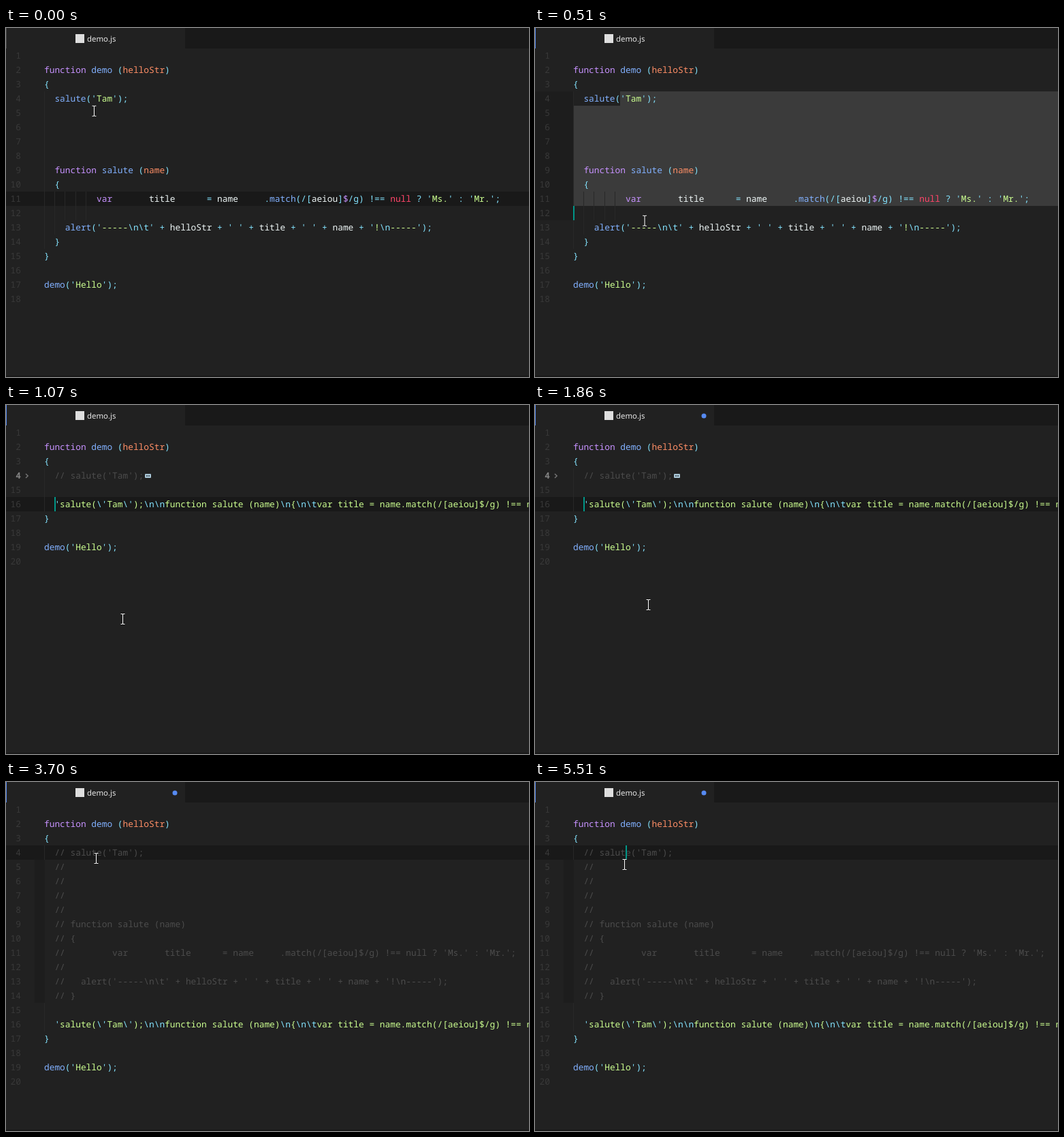
Recreate the animation shown at these times as an HTML page. Size 768x512 px, loop 5590 ms.

```html
<!DOCTYPE html>
<html lang="en">
<head>
<meta charset="utf-8">
<title>Editor demo</title>
<style>
  html, body { margin: 0; width: 100%; height: 100%; overflow: hidden; background: #212121; }
  svg { display: block; width: 768px; height: 512px; }
  text {
    font: 12.83px "Noto Sans Mono", monospace;
    white-space: pre;
    text-rendering: geometricPrecision;
  }
  text.tab { font: 11.4px "Noto Sans", sans-serif; }
</style>
</head>
<body>
<svg id="stage" viewBox="0 0 768 512"></svg>
<script>
const LOOP = 5590, COL = 7.7, ROW = 21, LEFT = 56, TOP = 30;
const FOCUS = 50, RUN = 1070, DIRTY = 1360, UNFOLD = 3100;
const C = {
  bg: '#212121', dark: '#191919', gutter: '#1d1d1d', select: '#3b3b3b', guide: '#282828',
  num: '#393939', comment: '#4c4c4c', caret: '#009688', accent: '#568af2',
  keyword: '#c792ff', call: '#82b1ff', punct: '#84e4ff', string: '#ccff90',
  param: '#ff8f66', nil: '#ff4569', plain: '#eef6f6'
};

const stage = document.getElementById('stage');
const colX = c => LEFT + c * COL;
const rowY = r => TOP + (r - 1) * ROW;

function el(parent, tag, attrs, content) {
  const n = document.createElementNS('http://www.w3.org/2000/svg', tag);
  set(n, attrs);
  if (content) n.textContent = content;
  return parent.appendChild(n);
}
function set(n, attrs) {
  for (const k in attrs) n.setAttribute(k, attrs[k]);
}
const rect = (p, x, y, width, height, fill) => el(p, 'rect', { x, y, width, height, fill });
const group = p => el(p, 'g', {});
const show = (n, on) => n.setAttribute('display', on ? 'inline' : 'none');

// Code
const body = String.raw`  salute('Tam');




  function salute (name)
  {
          var       title      = name     .match(/[aeiou]$/g) !== null ? 'Ms.' : 'Mr.';

    alert('-----\n\t' + helloStr + ' ' + title + ' ' + name + '!\n-----');
  }`.split('\n');
const head = ['', 'function demo (helloStr)', '{'];
const tail = ['}', '', "demo('Hello');", ''];
const packed = String.raw`  'salute(\'Tam\');\n\nfunction salute (name)\n{\n\tvar title = name.match(/[aeiou]$/g) !== null ? `;
const comments = body.map(s => '  // ' + s.slice(2));

const plainLines = [...head, ...body, ...tail];
const foldedLines = [...head, comments[0], '', packed, ...tail];
const openLines = [...head, ...comments, '', packed, ...tail];

// Highlighting
const TOKENS = /(\/\/.*)|('(?:\\.|[^'\\])*'?)|(\/\[\w+\]\$\/g)|(\b(?:function|var)\b)|(null)|(\w+(?= ?\())|(\((?:name|helloStr)\))|(\w+)|([^\s\w]+?)/g;
const KINDS = ['comment', 'string', 'regex', 'keyword', 'nil', 'call', 'param', 'plain', 'punct'];

function parts(kind, s) {
  if (kind === 'string') {
    return s.match(/\\.|^'|'$|[^\\']+/g).map(p => [p, /^['\\]/.test(p) ? C.punct : C.string]);
  }
  if (kind === 'regex') {
    return s.match(/\w{2,}|./g).map(p => [p, p === '$' ? C.keyword : p.length > 1 ? C.plain : C.punct]);
  }
  if (kind === 'param') {
    return [['(', C.punct], [s.slice(1, -1), C.param], [')', C.punct]];
  }
  return [[s, C[kind]]];
}

function drawWords(p, s, col, y, fill) {
  for (const m of s.matchAll(/\S+/g)) el(p, 'text', { x: colX(col + m.index), y, fill }, m[0]);
}

function drawCode(p, lines, number) {
  lines.forEach((line, i) => {
    const y = rowY(i + 1) + 15;
    const n = number(i + 1);
    el(p, 'text', { x: 22, y, fill: C.num, 'text-anchor': 'end' }, String(n));
    for (const m of line.matchAll(TOKENS)) {
      const kind = KINDS[m.slice(1).findIndex(Boolean)];
      let col = m.index;
      for (const [s, fill] of parts(kind, m[0])) {
        drawWords(p, s, col, y, fill);
        col += s.length;
      }
    }
  });
}

const guide = (p, col, from, to) =>
  rect(p, Math.floor(colX(col)), rowY(from), 1, (to - from + 1) * ROW, C.guide);

// Window
rect(stage, 0, 0, 768, 512, C.bg);
rect(stage, 263, 0, 505, 30, C.dark);
rect(stage, 0, 510, 768, 2, C.dark);
const edge = rect(stage, 0, 0, 1, 30, C.accent);
rect(stage, 102, 9, 13, 13, '#dedede');
el(stage, 'text', { class: 'tab', x: 119, y: 20, fill: '#e6e6e6' }, 'demo.js');
const dot = el(stage, 'circle', { cx: 248, cy: 16, r: 3.5, fill: C.accent });

// Before the command runs
const plain = group(stage);
const activeRow = rect(plain, 0, 0, 768, ROW, C.dark);
const shade = rect(plain, 0, rowY(4), 57, ROW, C.gutter);
const selFirst = rect(plain, 125, rowY(4), 0, ROW, C.select);
const selMid = rect(plain, 57, rowY(5), 711, 0, C.select);
const selLast = rect(plain, 57, 0, 0, ROW, C.select);
guide(plain, 0, 4, 14);
guide(plain, 2, 11, 13);
[4, 6, 8].forEach(c => guide(plain, c, 11, 12));
drawCode(plain, plainLines, n => n);

// Commented and folded
const folded = group(stage);
rect(folded, 0, rowY(6), 768, ROW, C.dark);
guide(folded, 0, 4, 6);
drawCode(folded, foldedLines, n => n < 5 ? n : n + 10);
rect(folded, 12, rowY(4), 11, ROW, C.bg);
el(folded, 'text', { x: 22, y: rowY(4) + 15, fill: '#858585', 'text-anchor': 'end', 'font-weight': 700, style: 'font-weight:700' }, '4');
el(folded, 'path', { d: 'M29 101l3.2 3-3.2 3', fill: 'none', stroke: '#777', 'stroke-width': 1.4 });
el(folded, 'rect', { x: 204, y: 101, width: 9, height: 6, rx: 1, fill: '#a9c6d6' });
[206, 208, 210].forEach(x => rect(folded, x, 103, 1, 2, '#29323a'));

// Commented and unfolded
const open = group(stage);
rect(open, 0, rowY(4), 768, ROW, C.dark);
rect(open, 42, rowY(5), 15, 10 * ROW, C.gutter);
guide(open, 0, 4, 4);
guide(open, 0, 15, 16);
drawCode(open, openLines, n => n);

const caret = rect(stage, 0, 0, 2, ROW, C.caret);
const mouse = group(stage);
const beam = 'M-3 -7.5H-1L0 -6.7L1 -7.5H3M0 -6.7V6.7M-3 7.5H-1L0 6.7L1 7.5H3';
el(mouse, 'path', { d: beam, fill: 'none', stroke: '#000', 'stroke-width': 2.6, opacity: .55 });
el(mouse, 'path', { d: beam, fill: 'none', stroke: '#fff', 'stroke-width': 1.1 });

// Pointer path: time, x, y
const path = [
  [0, 129.5, 122], [50, 128, 112], [120, 128, 108], [200, 130, 119], [290, 141, 182],
  [380, 150.5, 242], [560, 165, 298], [700, 169, 310], [950, 171.5, 314],
  [1350, 171.5, 314], [1860, 166.5, 293], [2320, 166.5, 292], [2500, 168, 276],
  [2680, 169.5, 248], [2830, 168, 204], [2980, 150, 138], [3100, 134, 111],
  [3420, 132.5, 110], [3700, 132.5, 112], [4030, 132.5, 117], [4590, 132.5, 117],
  [4720, 133, 116.5], [4900, 133, 117], [5130, 133.5, 119], [5410, 133, 119],
  [5510, 131.5, 121], [LOOP, 131.5, 121]
];
function pointer(t) {
  const i = path.findIndex(k => k[0] > t);
  const [t0, x0, y0] = path[i - 1], [t1, x1, y1] = path[i];
  const f = (t - t0) / (t1 - t0);
  return [x0 + (x1 - x0) * f, y0 + (y1 - y0) * f];
}

function select(t, x, y) {
  const focused = t >= FOCUS;
  const row = focused ? Math.max(4, Math.floor((y - 4 - TOP) / ROW) + 1) : 4;
  const mid = Math.round((x - LEFT) / COL);
  const col = row === 4 ? 9 : Math.min(mid, plainLines[row - 1].length);
  const spread = row > 4;
  show(activeRow, !spread);
  set(activeRow, { y: rowY(focused ? 4 : 11) });
  set(shade, { height: spread ? (row - 3) * ROW : 0 });
  set(selFirst, { width: spread ? 643 : 0 });
  set(selMid, { height: Math.max(0, row - 5) * ROW });
  set(selLast, { y: rowY(row), width: spread ? Math.max(0, colX(col) - 57) : 0 });
  set(caret, { x: Math.round(colX(col)), y: rowY(row) });
  show(caret, focused && t < 1000);
}

const blink = (t, from) => Math.floor((t - from) / 400) % 2 === 0;

function draw(t) {
  const [x, y] = pointer(t);
  set(mouse, { transform: `translate(${x.toFixed(2)} ${y.toFixed(2)})` });
  set(edge, { fill: t < FOCUS ? '#484848' : C.accent });
  show(dot, t >= DIRTY);
  show(plain, t < RUN);
  show(folded, t >= RUN && t < UNFOLD);
  show(open, t >= UNFOLD);
  if (t < RUN) {
    select(t, x, y);
  } else if (t < UNFOLD) {
    set(caret, { x: 71, y: rowY(6) });
    show(caret, blink(t, 960));
  } else {
    set(caret, { x: 133, y: rowY(4) });
    show(caret, blink(t, UNFOLD));
  }
}

const start = performance.now();
function tick() {
  draw((performance.now() - start) % LOOP);
  requestAnimationFrame(tick);
}
tick();
</script>
</body>
</html>
```
